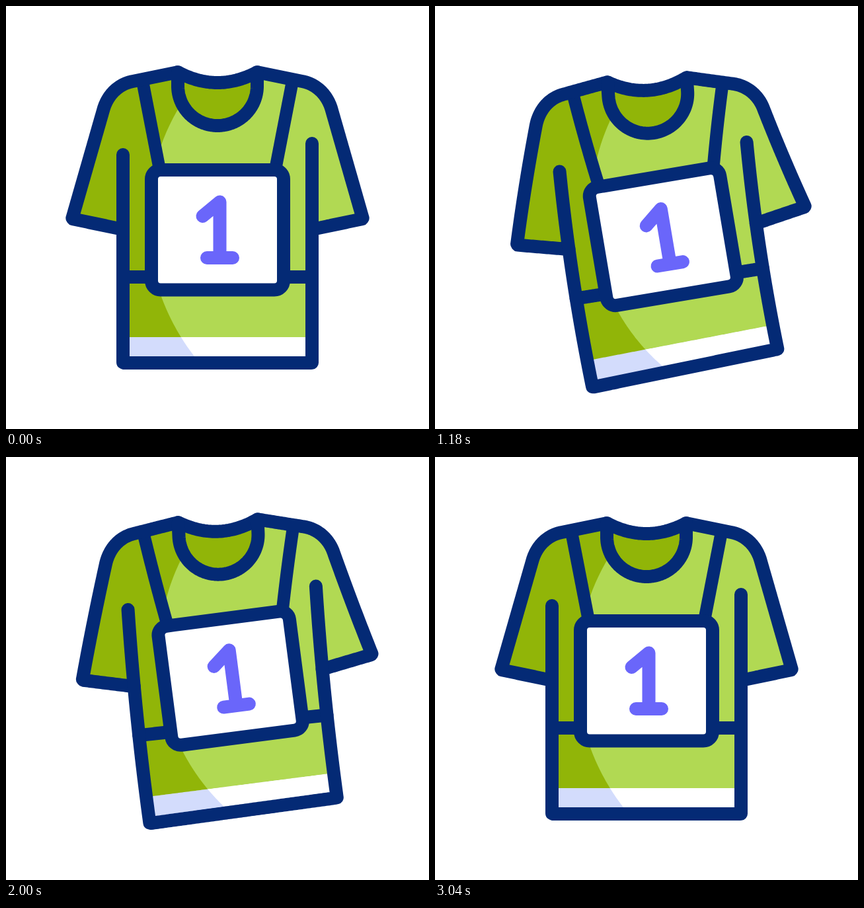
An HTML page for the animation above (3.26 s loop, 640 by 640 pixels).

```html
<!DOCTYPE html>
<html lang="en">
<head>
<meta charset="utf-8">
<title>Hopping race shirt</title>
<style>
  html, body { margin: 0; width: 100%; height: 100%; overflow: hidden; background: #fff; }
  svg { display: block; width: 100%; height: 100%; }
  .line { fill: none; stroke: #042a75; stroke-width: 20; stroke-linecap: round; stroke-linejoin: round; }
  .strap { stroke-width: 19; }
  .dark { fill: #91b508; }
  .light { fill: #b1d953; }
  .lilac { fill: #d3dcfc; }
  .white { fill: #fff; }
  .digit { fill: none; stroke: #6a66fa; stroke-width: 20; stroke-linecap: round; stroke-linejoin: round; }
</style>
</head>
<body>
<svg viewBox="0 0 640 640">
  <clipPath id="lit">
    <path class="cloth inner" d="M306 95A335 335 0 0 0 293 540L300 570H600V80H320Z"/>
  </clipPath>
  <path class="cloth dark" d="M260 100Q320 132 380 100L448 114C470 118 487 135 493 158L540 322L463 338V540H177V338L100 322L147 158C153 135 170 118 192 114Z"/>
  <path class="cloth lilac" d="M177 501H463V540H177Z"/>
  <g clip-path="url(#lit)">
    <path class="cloth light" d="M200 120L320 130L380 105L448 114C470 118 487 135 493 158L540 322L463 338V501H200Z"/>
    <path class="cloth white" d="M200 501H463V540H200Z"/>
  </g>
  <path class="cloth dark" d="M260 100Q320 132 380 100V121A60 60 0 0 1 260 121Z"/>
  <path class="cloth inner line strap" d="M207 116L233 250"/>
  <path class="cloth inner line strap" d="M433 116L407 250"/>
  <path class="cloth line" d="M177 410H225"/>
  <path class="cloth line" d="M463 410H415"/>
  <path class="cloth line" d="M177 338L100 322L147 158C153 135 170 118 192 114L260 100Q320 132 380 100L448 114C470 118 487 135 493 158L540 322L463 338"/>
  <path class="cloth line" d="M260 100V121A60 60 0 0 0 380 121V100"/>
  <path class="cloth line" d="M177 225V540H463V208"/>
  <g id="bib">
    <rect class="white" x="-100" y="-91" width="200" height="181.5" rx="14"/>
    <rect class="line" x="-100" y="-91" width="200" height="181.5" rx="14"/>
    <path class="digit" d="M-22.5 -21L3.5 -42.5V42M-16 42H23"/>
  </g>
</svg>
<script>
const LOOP = 3260, TOP = 100, HEIGHT = 440, BIB_Y = 339;

// Keys are [time in ms, value]
const hop = [[200, 0], [480, 22.5], [850, -25], [1330, 22], [1750, -27.5], [2260, 22], [2660, -9.5], [3040, 0]];
const bend = [[610, 0], [1060, 17.3], [1510, -16.5], [1960, 8], [2460, -4.7], [2880, 0]];
const turn = [[610, 0], [1060, 14], [1510, -12.5], [1960, 7.6], [2460, -4.6], [2880, 0]];

function at(keys, t) {
  if (t <= keys[0][0]) return keys[0][1];
  for (let i = 1; i < keys.length; i++) {
    const [t0, a] = keys[i - 1], [t1, b] = keys[i];
    if (t < t1) return a + (b - a) * (1 - Math.cos(Math.PI * (t - t0) / (t1 - t0))) / 2;
  }
  return keys[keys.length - 1][1];
}

// Angle of the cloth, in radians, grows from collar to hem
const angleAt = (y, hem) => hem * (0.29 + 0.71 * (y - TOP) / HEIGHT) * Math.PI / 180;

function warp(x, y, hem, dy) {
  const mean = angleAt((y + TOP) / 2, hem);
  const a = angleAt(y, hem);
  const len = y - TOP, off = x - 320;
  return [
    320 + 0.08 * hem + len * Math.sin(mean) + off * Math.cos(a),
    TOP + dy + len * Math.cos(mean) - off * Math.sin(a)
  ];
}

function sample(path) {
  const total = path.getTotalLength(), n = Math.ceil(total / 2.5), points = [];
  for (let i = 0; i <= n; i++) {
    const p = path.getPointAtLength(total * i / n);
    points.push([p.x, p.y]);
  }
  return { path, points, inner: path.classList.contains('inner') };
}

const parts = [...document.querySelectorAll('.cloth')].map(sample);
const bib = document.getElementById('bib');

function draw() {
  const t = performance.now() % LOOP;
  const dy = at(hop, t), hem = at(bend, t), tilt = at(turn, t);
  const core = 1.27 * tilt; // bib, straps and shading follow the bib's turn
  for (const { path, points, inner } of parts) {
    path.setAttribute('d', 'M' + points.map(([x, y]) =>
      warp(x, y, inner ? core : hem, dy).map(v => v.toFixed(2)).join(' ')).join('L'));
  }
  const [x, y] = warp(320, BIB_Y, core, dy);
  bib.setAttribute('transform', `translate(${x} ${y}) rotate(${-tilt})`);
  requestAnimationFrame(draw);
}
draw();
</script>
</body>
</html>
```
